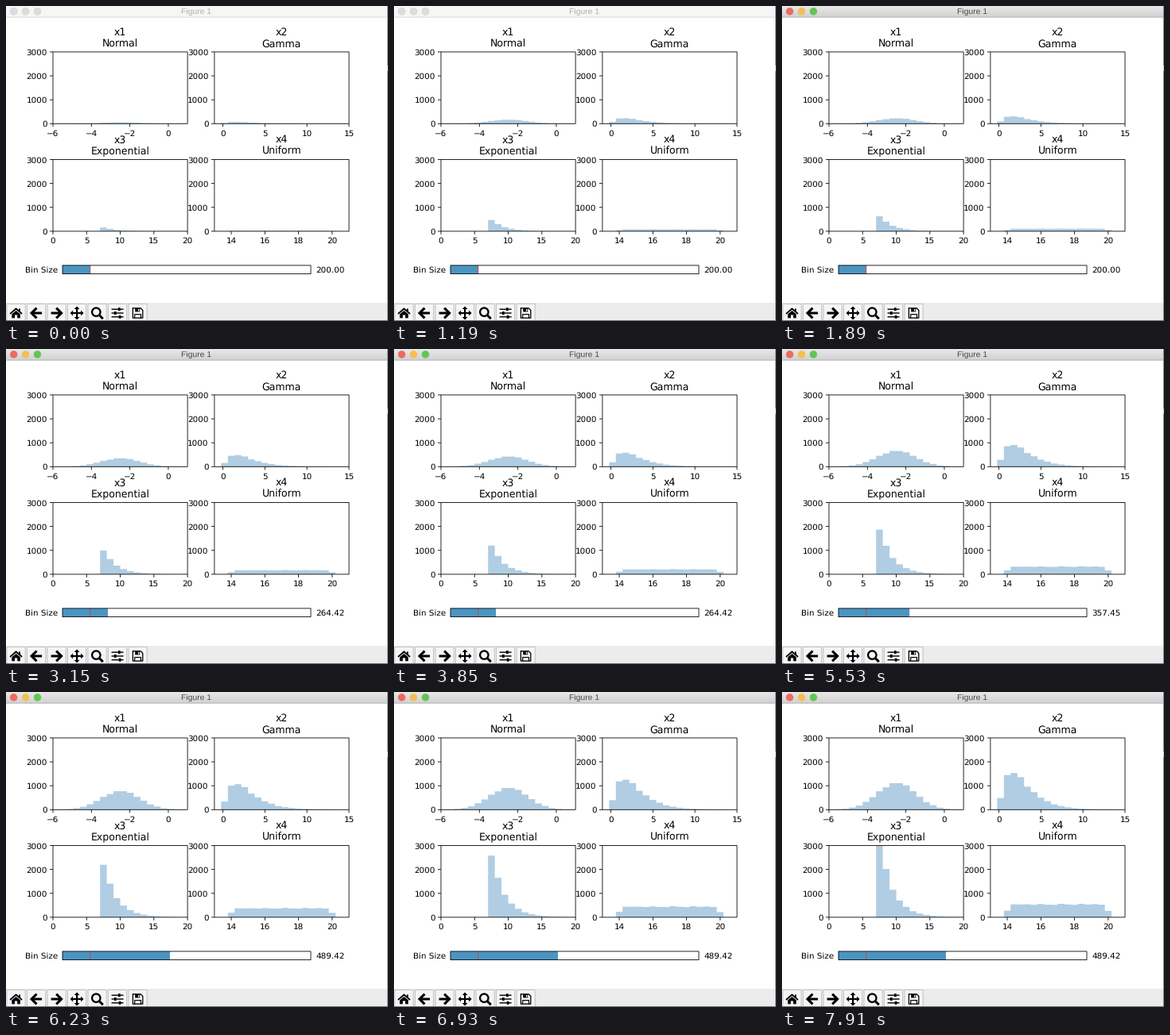
Write a matplotlib script that moves like this. It is 480x397 px and loops after 8000 ms.

```python
import math

import matplotlib.pyplot as plt
import numpy as np
from matplotlib.animation import FuncAnimation
from matplotlib.collections import LineCollection
from matplotlib.patches import Circle, Polygon, Rectangle

plt.rcParams["text.hinting"] = "no_hinting"

W, H, DPI = 480, 397, 64
PX = 72 / DPI                      # points per pixel
LOOP, STEP = 8000, 20              # ms
SPINE = 0.85
PLOT_W, PLOT_H, Y_MAX, BINS = 169.1, 90.4, 3000, 20

BAR_BLUE = "#b0cde3"
SLIDER_BLUE = "#4b95c2"
SLIDER_LEFT, SLIDER_TOP, SLIDER_W, SLIDER_H = 71, 326.9, 312, 10.7
LIGHTS = ["#ed6a5f", "#f5bf4f", "#61c554"]
ACTIVE_AT = 1890

# Moments at which a new batch of samples is drawn, and slider moves
BATCHES = [140, 490, 840, 1190, 1540, 1890, 2240, 2590, 2870, 3150, 3570, 3850,
           4130, 4480, 4900, 5180, 5530, 5810, 6230, 6580, 6860, 7210, 7560, 7910]
SLIDES = [(0, 200.0), (2870, 264.42), (4200, 357.45), (6230, 489.42)]
FIRST_N = 400


def normal_cdf(x):
    return 0.5 * (1 + math.erf((x + 2.5) / math.sqrt(2)))


def gamma_cdf(x):
    u = max(x, 0) / 1.5
    return 1 - (1 + u) * math.exp(-u)


def expon_cdf(x):
    return 1 - math.exp(-max(x - 7, 0) / 2)


def uniform_cdf(x):
    return min(max((x - 14) / 6, 0), 1)


# title, name, left, bottom, range, ticks, distribution
PANELS = [
    ("x1", "Normal", 59, 148.3, (-6, 1), range(-6, 1, 2), normal_cdf),
    ("x2", "Gamma", 261.9, 148.3, (-1, 15), range(0, 16, 5), gamma_cdf),
    ("x3", "Exponential", 59, 283.9, (0, 20), range(0, 21, 5), expon_cdf),
    ("x4", "Uniform", 261.9, 283.9, (13, 21), range(14, 21, 2), uniform_cdf),
]

fig = plt.figure(figsize=(W / DPI, H / DPI), dpi=DPI, facecolor="white")
ax = fig.add_axes([0, 0, 1, 1])
rng = np.random.default_rng(4)


def text(x, y, s, size=10.42, ha="center", font="DejaVu Sans", color="black"):
    return ax.text(x, y, s, fontsize=size * PX, ha=ha, va="baseline",
                   family=font, color=color, zorder=6)


def rect(x0, y0, x1, y1, fc, ec="none", lw=0.0, z=1):
    return ax.add_patch(Rectangle((x0, y0), x1 - x0, y1 - y0, fc=fc, ec=ec,
                                  lw=lw * PX, zorder=z, snap=False))


def poly(points, color="black", z=6):
    return ax.add_patch(Polygon(points, closed=True, fc=color, ec="none",
                                zorder=z, snap=False))


def stroke(points, lw, color="black", z=6):
    xs, ys = zip(*points)
    ax.plot(xs, ys, color=color, lw=lw * PX, zorder=z, snap=False,
            solid_capstyle="butt", solid_joinstyle="miter")


def slider_x(value):
    return SLIDER_LEFT + (value - 100) / 900 * SLIDER_W


# ---- histograms

class Hist:
    def __init__(self, title, name, left, bottom, span, ticks, cdf):
        lo, hi = span
        self.bottom = bottom
        edges = np.linspace(lo, hi, BINS + 1)
        share = np.diff([cdf(e) for e in edges])
        self.share = share * (1 + 0.025 * rng.standard_normal(BINS))
        self.xs = np.repeat(left + (edges - lo) / (hi - lo) * PLOT_W, 2)
        self.area = poly([(left, bottom)] * 3, BAR_BLUE, 2)

        top, right = bottom - PLOT_H, left + PLOT_W
        rect(left, top, right, bottom, "none", "black", SPINE, 4)
        marks = []
        for v in ticks:
            x = left + (v - lo) / (hi - lo) * PLOT_W
            marks.append([(x, bottom), (x, bottom + 4)])
            text(x, bottom + 15.2, str(v).replace("-", "\u2212"))
        for v in range(0, Y_MAX + 1, 1000):
            y = bottom - v / Y_MAX * PLOT_H
            marks.append([(left - 4, y), (left, y)])
            text(left - 7.2, y + 3.9, str(v), ha="right")
        ticks = LineCollection(marks, colors="black", linewidths=SPINE * PX, zorder=4)
        ticks.set_snap(False)
        ax.add_collection(ticks, autolim=False)
        mid = (left + right) / 2
        text(mid, top - 21.1, title, 12.5)
        text(mid, top - 6.2, name, 12.5)

    def show(self, n):
        tops = self.bottom - np.minimum(self.share * n, Y_MAX) / Y_MAX * PLOT_H
        ys = np.concatenate([[self.bottom], np.repeat(tops, 2), [self.bottom]])
        self.area.set_xy(np.column_stack([self.xs, ys]))


hists = [Hist(*p) for p in PANELS]

# ---- slider
right, low = SLIDER_LEFT + SLIDER_W, SLIDER_TOP + SLIDER_H
level = rect(SLIDER_LEFT, SLIDER_TOP, slider_x(200), low, SLIDER_BLUE, z=2)
mark = slider_x(200)
stroke([(mark, SLIDER_TOP), (mark, low)], 1.1, "#b5504c", 3)
rect(SLIDER_LEFT, SLIDER_TOP, right, low, "none", "black", SPINE, 4)
text(65, 335.4, "Bin Size", ha="right")
readout = text(right + 6.2, 335.4, "200.00", ha="left")

# ---- window frame
bar = ax.imshow(np.zeros((14, 1)), cmap="gray", vmin=0, vmax=255, aspect="auto",
                extent=(0, W, 14, 0), interpolation="nearest", zorder=1)
bar_edge = rect(0, 13.6, W, 14.6, "#b4b4b4", z=2)
lights = [ax.add_patch(Circle((x, 6.8), 4.4, lw=0.6 * PX, zorder=3))
          for x in (9.7, 24.6, 39.5)]
caption = text(239, 10.4, "Figure 1", 10.4, font="Liberation Sans")
rect(W - 1, 0, W, H, "#808080", z=8)
rect(W - 1, 75, W, 82, "#c8c8c8", z=9)
rect(0, H - 1, W, H, "#707070", z=8)


# ---- toolbar
def arrow(cx, cy, d):
    stroke([(cx - 7 * d, cy), (cx + 5 * d, cy)], 3)
    stroke([(cx - 0.4 * d, cy - 6.4), (cx + 6 * d, cy), (cx - 0.4 * d, cy + 6.4)], 3.1)


def home(cx, cy):
    stroke([(cx - 7.5, cy + 1), (cx, cy - 5.5), (cx + 7.5, cy + 1)], 1.9)
    rect(cx + 3.4, cy - 5.5, cx + 5.4, cy - 1, "black", z=6)
    poly([(cx - 5.3, cy + 1.4), (cx, cy - 3), (cx + 5.3, cy + 1.4),
          (cx + 5.3, cy + 6.3), (cx + 1.6, cy + 6.3), (cx + 1.6, cy + 2.4),
          (cx - 1.6, cy + 2.4), (cx - 1.6, cy + 6.3), (cx - 5.3, cy + 6.3)])


def pan(cx, cy):
    stroke([(cx - 6, cy), (cx + 6, cy)], 2.2)
    stroke([(cx, cy - 6), (cx, cy + 6)], 2.2)
    for dx, dy in ((1, 0), (-1, 0), (0, 1), (0, -1)):
        bx, by = cx + 5 * dx, cy + 5 * dy
        poly([(cx + 8.5 * dx, cy + 8.5 * dy),
              (bx + 3.4 * dy, by + 3.4 * dx), (bx - 3.4 * dy, by - 3.4 * dx)])


def zoom(cx, cy):
    ax.add_patch(Circle((cx - 1.3, cy - 1.3), 5.2, fc="none", ec="black",
                        lw=2.3 * PX, zorder=6))
    stroke([(cx + 2.2, cy + 2.2), (cx + 7.2, cy + 7.2)], 3)


def tune(cx, cy):
    for dy, knob in ((-4.8, 2.2), (0, -2.8), (4.8, 3)):
        stroke([(cx - 7.5, cy + dy), (cx + 7.5, cy + dy)], 1.4)
        rect(cx + knob - 1.4, cy + dy - 2, cx + knob + 1.4, cy + dy + 2, "black", z=6)


def save(cx, cy):
    stroke([(cx - 6.2, cy - 6.2), (cx + 3.6, cy - 6.2), (cx + 6.2, cy - 3.6),
            (cx + 6.2, cy + 6.2), (cx - 6.2, cy + 6.2), (cx - 6.2, cy - 6.9)], 1.3)
    rect(cx - 3.4, cy - 6, cx + 2.6, cy - 1.6, "black", z=6)
    rect(cx + 0.3, cy - 5, cx + 1.7, cy - 2.4, "white", z=7)
    stroke([(cx - 3.9, cy + 6), (cx - 3.9, cy + 1.6), (cx + 3.9, cy + 1.6),
            (cx + 3.9, cy + 6)], 1.2)


rect(0, 374, W, H, "#ececec")
icons = [home, lambda x, y: arrow(x, y, -1), lambda x, y: arrow(x, y, 1),
         pan, zoom, tune, save]
for k, icon in enumerate(icons):
    cx = 12.6 + 25.5 * k
    rect(cx - 11.6, 375.5, cx + 11.6, 396.5, "#f5f5f5", "#bdbdbd", 0.9, 2)
    icon(cx, 387)

ax.set_xlim(0, W)
ax.set_ylim(H, 0)
ax.axis("off")


# ---- motion
def setting(t):
    return [v for start, v in SLIDES if start <= t][-1]


def samples(t):
    return FIRST_N + sum(setting(b) for b in BATCHES if b <= t)


def style_window(active):
    shades = np.linspace(231, 209, 14) if active else np.full(14, 246)
    bar.set_data(shades[:, None])
    bar_edge.set_facecolor("#b4b4b4" if active else "#d9d9d9")
    caption.set_color("#4a4a4a" if active else "#b2b2b2")
    for light, color in zip(lights, LIGHTS):
        light.set_facecolor(color if active else "#dddddd")
        light.set_edgecolor(color if active else "#cecece")


def update(i):
    t = i * STEP + STEP / 2
    value = setting(t)
    n = samples(t)
    for h in hists:
        h.show(n)
    level.set_width(slider_x(value) - SLIDER_LEFT)
    readout.set_text(f"{value:.2f}")
    style_window(t >= ACTIVE_AT)
    return []


anim = FuncAnimation(fig, update, frames=LOOP // STEP, interval=STEP,
                     init_func=lambda: update(0), repeat=True, repeat_delay=0)
plt.show()
```
